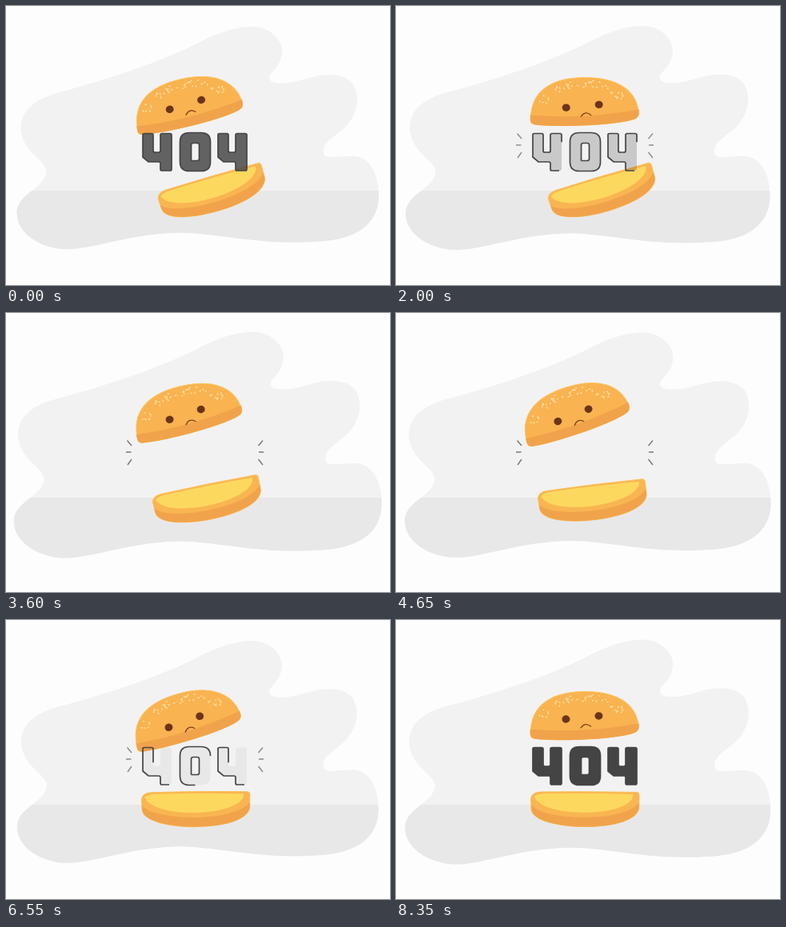
An HTML page for the animation above (8400 ms loop, 480 by 349 pixels).

```html
<!DOCTYPE html>
<html lang="en">
<head>
<meta charset="utf-8">
<title>404</title>
<style>
  html, body { margin: 0; width: 100%; height: 100%; overflow: hidden; background: #fdfdfd; }
  svg { display: block; width: 100%; height: 100%; }
</style>
</head>
<body>
<svg viewBox="0 0 480 349" role="img" aria-label="404">
  <defs>
    <clipPath id="blobClip">
      <path id="blob" d="M306 26C330 25 350 45 344 64C341 78 328 84 329 91C331 99 352 98 372 92C397 84 420 83 433 97C445 117 436 140 422 153C408 165 394 172 397 185C400 193 420 186 438 188C460 192 468 222 465 245C461 275 435 291 395 294C325 299 285 288 235 284C170 279 110 305 75 304C45 303 12 285 14 256C17 234 48 228 51 208C51 192 22 185 19 155C18 125 45 113 75 106C130 91 190 71 235 49C265 33 285 27 306 26Z"/>
    </clipPath>
  </defs>

  <g clip-path="url(#blobClip)">
    <rect width="480" height="349" fill="#f2f2f2"/>
    <rect y="231" width="480" height="118" fill="#e8e8e9"/>
  </g>

  <g id="bottom">
    <path fill="#f9b552" stroke="#fbc057" d="M168 222Q170 215 180 214.500Q240 214 301 216Q303.500 217 303.500 220L303 236C300 250 275 258.500 238 258.500C205 258.500 170 251 168.500 236Z"/>
    <path fill="#f1a34b" d="M168.300 230C180 250 283 255 303.300 229L303 236C300 250 275 258.500 238 258.500C205 258.500 170 251 168.500 236Z"/>
    <path fill="#fdd85e" d="M172 220Q176 216.500 186 216.500Q245 216 296 218.500C297 232 268 241 236 241C204 241 176 233 172 220Z"/>
  </g>

  <g id="top">
    <path fill="#f9b351" stroke="#fbc25a" d="M168.500 142C168.500 108 192 89.500 236 89.500C276 89.500 300 105 303.500 132Q305 140 297 142C270 150 200 151 174 147.500Q168.500 147 168.500 142Z"/>
    <path fill="#f1a34b" d="M168 136Q236 142 304 130Q305 140 297 142.500C270 150.500 200 151.500 174 148Q168 147 168 142Z"/>
    <g id="seeds" fill="#fde0a0"/>
    <g id="face" fill="#6b3419">
      <ellipse cx="213" cy="127" rx="5" ry="4.700"/>
      <ellipse cx="254" cy="123.500" rx="5" ry="4.700"/>
      <path d="M231.500 138Q237 130.500 244 136.500" fill="none" stroke="#7d431e" stroke-width="1.300" stroke-linecap="round"/>
    </g>
  </g>

  <path id="sparks" fill="none" stroke="#777" stroke-width="1.400" d="M151.500 159.500L157 166M150 174H156.500M152 190L157 183M321 159.500L315.500 166M322 174H316M321 190L315.500 183"/>

  <g id="digits" fill="#444" fill-rule="evenodd" stroke="#444" stroke-width="1.700">
    <path id="four" d="M204 206H195Q193 206 193 204V197Q193 195 191 195H178L171 189V161Q171 159.500 173 159.500H182Q184 159.500 184 161.500V181Q184 183 186 183H191Q193 183 193 181V161.500Q193 159.500 195 159.500H205Q207 159.500 207 161.500V204Q207 206 205 206Z"/>
    <path d="M236.500 206.500H229Q217.500 206.500 217.500 195V170Q217.500 158.500 229 158.500H244Q255.500 158.500 255.500 170V195Q255.500 206.500 244 206.500ZM231.500 193.500V174Q231.500 171.500 234 171.500H239Q241.500 171.500 241.500 174V191Q241.500 193.500 239 193.500Z"/>
    <use href="#four" x="94"/>
  </g>
</svg>
<script>
const LOOP = 8400, OUTLINE = 190;
const $ = id => document.getElementById(id);
const set = (id, name, value) => $(id).setAttribute(name, value);

// Smooth step from 0 to 1 between times a and b
function ramp(t, a, b) {
  const p = Math.min(1, Math.max(0, (t - a) / (b - a)));
  return p * p * (3 - 2 * p);
}
// Swing 0 -> 1 -> 0 over one period
const wave = (t, start, period) => .5 - .5 * Math.cos(2 * Math.PI * (t - start) / period);

let seed = 7;
const rand = () => (seed = seed * 16807 % 2147483647) / 2147483647;
for (let i = 0; i < 44; i++) {
  const a = Math.PI * (1.14 + .72 * rand()), r = .76 + .19 * rand();
  const x = 236 + 66 * r * Math.cos(a), y = 138 + 48 * r * Math.sin(a);
  const dot = document.createElementNS('http://www.w3.org/2000/svg', 'ellipse');
  const attrs = { cx: x, cy: y, rx: 1.4, ry: .8, transform: `rotate(${rand() * 180} ${x} ${y})` };
  for (const k in attrs) dot.setAttribute(k, attrs[k]);
  $('seeds').append(dot);
}

function draw(t) {
  const scale = 1 + .018 * wave(t, 600, 6000);
  set('blob', 'transform', `translate(240 165) scale(${scale}) translate(-240 -165)`);

  const tilt = 17 * Math.sin(wave(t, 1720, 7000) * Math.PI / 2);
  set('top', 'transform', `rotate(${-tilt} 236 167)`);
  const lift = 1 - ramp(t, 800, 2000) + ramp(t, 7200, LOOP);
  set('face', 'transform', `translate(0 ${-3.3 * lift})`);
  set('bottom', 'transform', `rotate(${18 * wave(t, 1050, 13200) - 18} 243 157)`);

  set('sparks', 'stroke-opacity', ramp(t, -100, 2800) - ramp(t, 6000, 8300));

  const drawn = 1 - ramp(t, 1500, 3500) + ramp(t, 5600, 7400);
  set('digits', 'fill-opacity', .82 * (1 - ramp(t, 700, 2700)) + ramp(t, 5700, 8350) ** 2);
  set('digits', 'stroke-opacity', drawn > 0 ? 1 : 0);
  set('digits', 'stroke-dasharray', drawn < 1 ? `${drawn * OUTLINE} 400` : 'none');
}

const start = performance.now();
function tick() {
  draw((performance.now() - start) % LOOP);
  requestAnimationFrame(tick);
}
tick();
</script>
</body>
</html>
```
